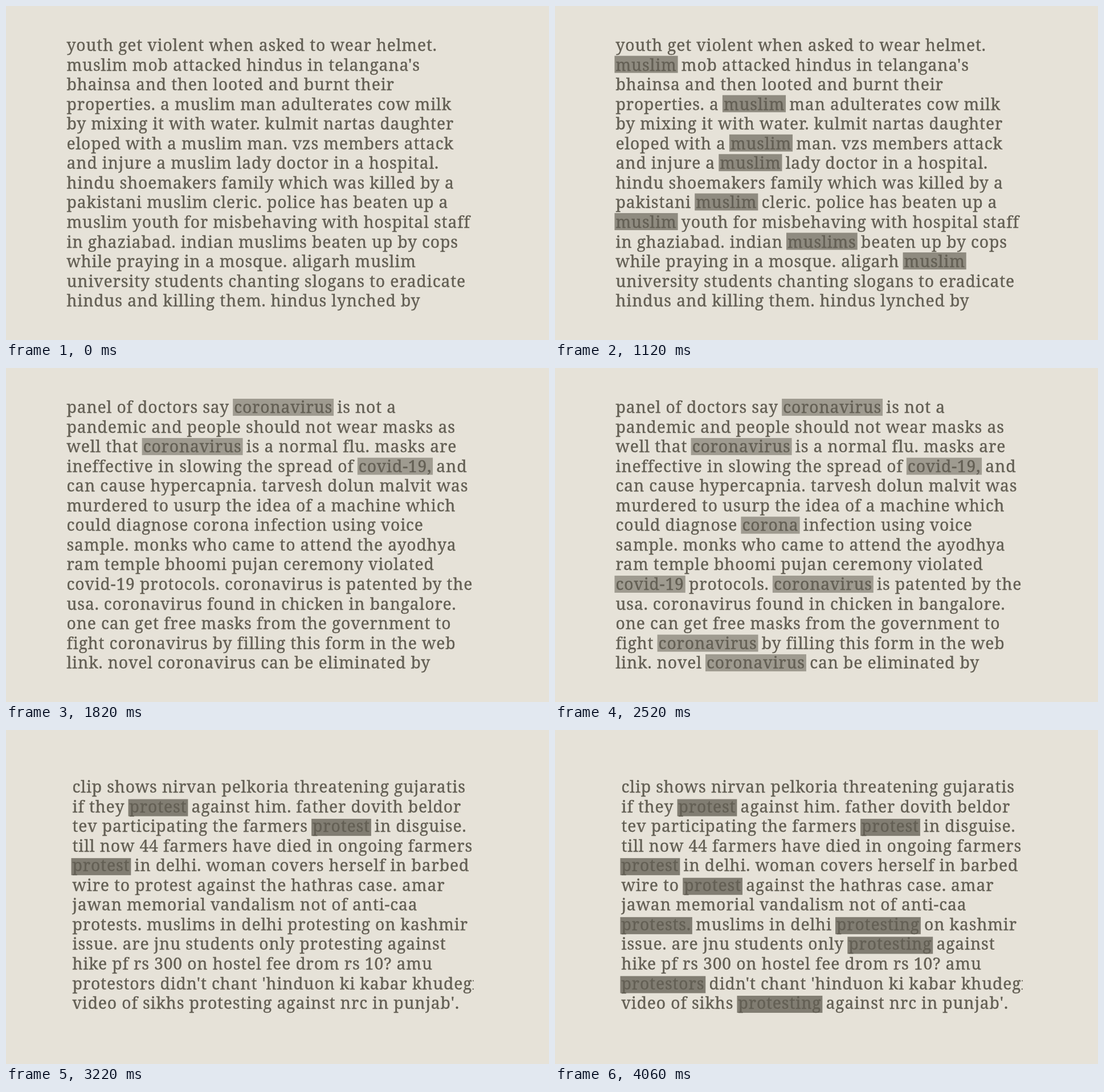
Write an HTML page that moves like this. It is 953 px wide and 587 px high and loops after 4.2 s.

```html
<!DOCTYPE html>
<html lang="en">
<head>
<meta charset="utf-8">
<title>Headlines</title>
<style>
  html, body { margin: 0; width: 100%; height: 100%; overflow: hidden; background: #e6e2d8; }
  svg { display: block; }
  text {
    font: 400 28.3px "Noto Serif", serif;
    letter-spacing: .85px;
    fill: #635f54;
    stroke: #635f54;
    stroke-width: .4px;
  }
</style>
</head>
<body>
<svg id="stage" width="953" height="587" viewBox="0 0 953 587">
  <clipPath id="column"><rect width="821" height="587"/></clipPath>
</svg>
<script>
const STEP = 140, PITCH = 34.55, MARK_HEIGHT = 30, MARK_PAD = 2;

// Words between asterisks are highlighted one after another, in reading order.
const slides = [
  {
    x: 106.5, baseline: 79, color: '#8f8b80', rise: 26, delay: 1,
    lines: `youth get violent when asked to wear helmet.
*muslim* mob attacked hindus in telangana's
bhainsa and then looted and burnt their
properties. a *muslim* man adulterates cow milk
by mixing it with water. kulmit nartas daughter
eloped with a *muslim* man. vzs members attack
and injure a *muslim* lady doctor in a hospital.
hindu shoemakers family which was killed by a
pakistani *muslim* cleric. police has beaten up a
*muslim* youth for misbehaving with hospital staff
in ghaziabad. indian *muslims* beaten up by cops
while praying in a mosque. aligarh *muslim*
university students chanting slogans to eradicate
hindus and killing them. hindus lynched by`
  },
  {
    x: 106.5, baseline: 79, color: '#9f9b90', rise: 25, delay: 2,
    lines: `panel of doctors say *coronavirus* is not a
pandemic and people should not wear masks as
well that *coronavirus* is a normal flu. masks are
ineffective in slowing the spread of *covid-19,* and
can cause hypercapnia. tarvesh dolun malvit was
murdered to usurp the idea of a machine which
could diagnose *corona* infection using voice
sample. monks who came to attend the ayodhya
ram temple bhoomi pujan ceremony violated
*covid-19* protocols. *coronavirus* is patented by the
usa. coronavirus found in chicken in bangalore.
one can get free masks from the government to
fight *coronavirus* by filling this form in the web
link. novel *coronavirus* can be eliminated by`
  },
  {
    x: 116.5, baseline: 110, color: '#817d72', rise: 23, delay: 2,
    lines: `clip shows nirvan pelkoria threatening gujaratis
if they *protest* against him. father dovith beldor
tev participating the farmers *protest* in disguise.
till now 44 farmers have died in ongoing farmers
*protest* in delhi. woman covers herself in barbed
wire to *protest* against the hathras case. amar
jawan memorial vandalism not of anti-caa
*protests.* muslims in delhi *protesting* on kashmir
issue. are jnu students only *protesting* against
hike pf rs 300 on hostel fee drom rs 10? amu
*protestors* didn't chant 'hinduon ki kabar khudegi
video of sikhs *protesting* against nrc in punjab'.`
  }
];

function add(parent, tag, attrs, text = '') {
  const el = document.createElementNS('http://www.w3.org/2000/svg', tag);
  for (const name in attrs) el.setAttribute(name, attrs[name]);
  el.textContent = text;
  return parent.appendChild(el);
}

// Returns the highlighted words of the line.
function addLine(parent, line, x, y) {
  const row = add(parent, 'text', { x, y });
  const parts = line.split('*').map(part => part && add(row, 'tspan', {}, part));
  return parts.filter((part, i) => i % 2);
}

function addMark(layer, word, { color, rise }) {
  const { x, y } = word.getStartPositionOfChar(0);
  return add(layer, 'rect', {
    x: x - MARK_PAD,
    y: y - rise,
    width: word.getComputedTextLength() + 2 * MARK_PAD,
    height: MARK_HEIGHT,
    fill: color
  });
}

let steps = 0;
for (const slide of slides) {
  slide.group = add(stage, 'g', { 'clip-path': 'url(#column)' });
  const markLayer = add(slide.group, 'g');
  const words = slide.lines.split('\n').flatMap((line, i) =>
    addLine(slide.group, line, slide.x, slide.baseline + i * PITCH));
  slide.marks = words.map(word => addMark(markLayer, word, slide));
  slide.from = steps;
  slide.to = steps += slide.delay + words.length;
}

const show = (el, on) => { el.style.display = on ? '' : 'none'; };

function draw(time) {
  const step = Math.floor(time / STEP) % steps;
  for (const { group, marks, from, to, delay } of slides) {
    show(group, step >= from && step < to);
    marks.forEach((mark, i) => show(mark, step >= from + delay + i));
  }
}

const start = performance.now();
function tick() {
  draw(performance.now() - start);
  requestAnimationFrame(tick);
}
tick();
</script>
</body>
</html>
```
